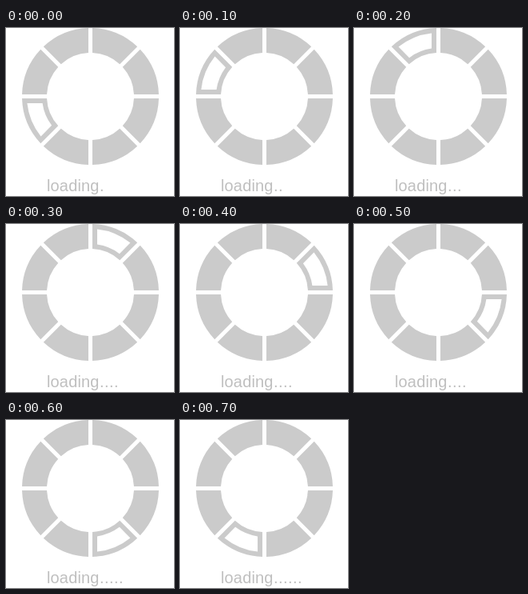
Write an HTML page that moves like this. It is 210 px wide and 210 px high and loops after 800 ms.

```html
<!DOCTYPE html>
<html lang="en">
<head>
<meta charset="utf-8">
<title>Loading</title>
<style>
  html, body { margin: 0; width: 100%; height: 100%; overflow: hidden; background: #fff; }
  svg { display: block; width: 100vw; height: 100vh; }
  text { font: 20px "Liberation Sans", Arial, sans-serif; fill: #bfbfbf; white-space: pre; }
  #word { letter-spacing: .15px; }
  #dots { letter-spacing: .44px; }
</style>
</head>
<body>
<svg viewBox="0 0 210 210">
  <g id="ring" fill="#cbcbcb"></g>
  <path id="hole" fill="#fff"/>
  <text id="word" x="51" y="204">loading</text>
  <text id="dots" x="117" y="204"></text>
</svg>
<script>
  const CX = 105.5, CY = 85.5, INNER = 54.5, OUTER = 85.5;
  const HALF_GAP = 2.5, BORDER = 6, STEP = 100;
  const DOTS = [1, 2, 3, 4, 4, 4, 5, 6];
  const $ = id => document.getElementById(id);

  // Ring piece k of 8, clockwise from the right, with parallel-sided gaps.
  function piece(k, inset) {
    const start = k * Math.PI / 4, end = start + Math.PI / 4;
    const r0 = INNER + inset, r1 = OUTER - inset, gap = HALF_GAP + inset;
    const at = (r, a) => `${(CX + r * Math.cos(a)).toFixed(3)} ${(CY + r * Math.sin(a)).toFixed(3)}`;
    const d0 = Math.asin(gap / r0), d1 = Math.asin(gap / r1);
    return `M${at(r0, start + d0)}L${at(r1, start + d1)}` +
      `A${r1} ${r1} 0 0 1 ${at(r1, end - d1)}L${at(r0, end - d0)}` +
      `A${r0} ${r0} 0 0 0 ${at(r0, start + d0)}Z`;
  }

  for (let k = 0; k < 8; k++) {
    const p = document.createElementNS("http://www.w3.org/2000/svg", "path");
    p.setAttribute("d", piece(k, 0));
    $("ring").append(p);
  }

  let shown = -1;
  function draw(now) {
    const step = Math.floor(now / STEP) % 8;
    if (step !== shown) {
      shown = step;
      $("hole").setAttribute("d", piece((step + 3) % 8, BORDER));
      $("dots").textContent = ".".repeat(DOTS[step]);
    }
  }

  const t0 = performance.now();
  function tick() {
    draw(performance.now() - t0);
    requestAnimationFrame(tick);
  }
  tick();
</script>
</body>
</html>
```
